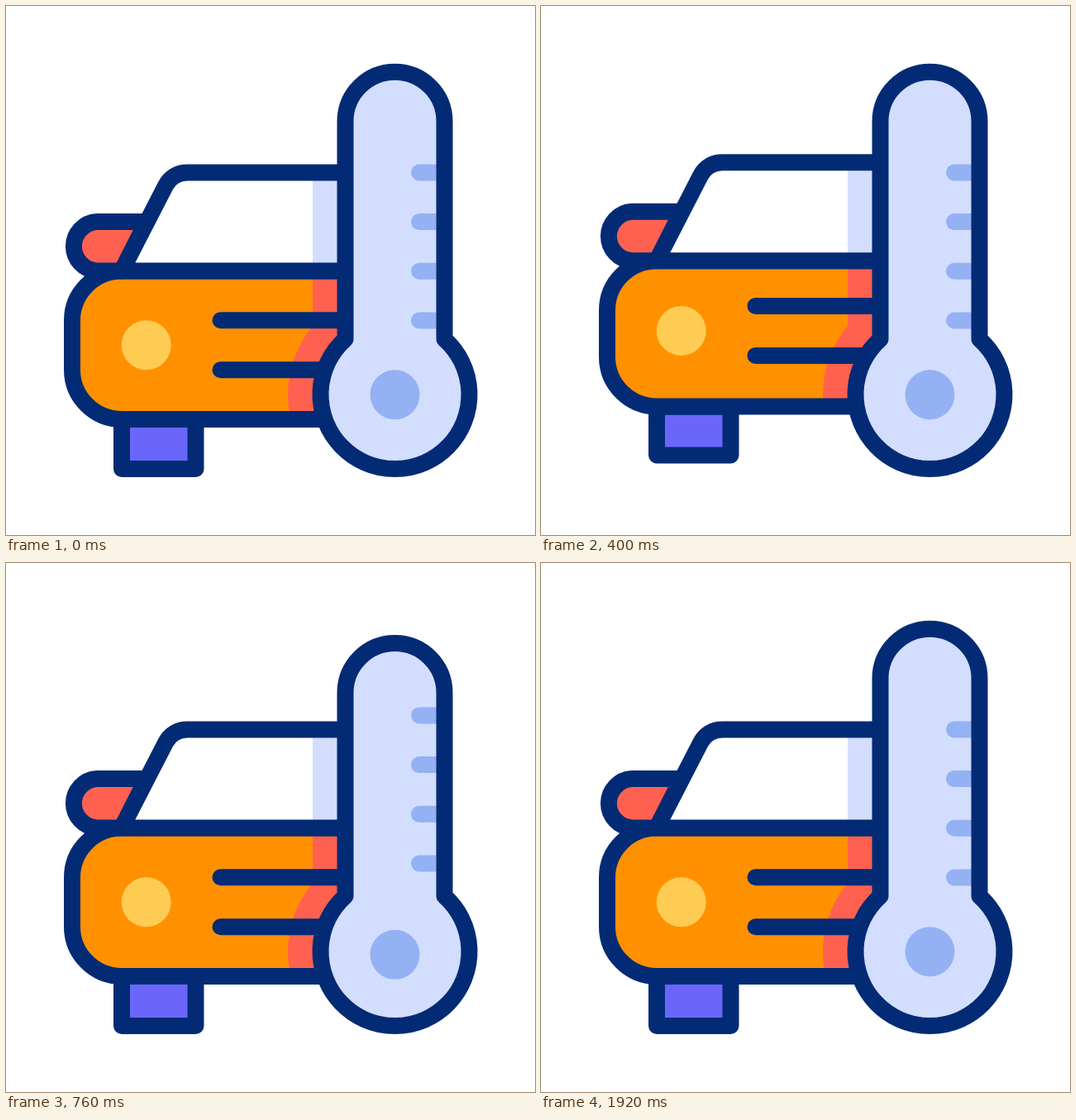
Animation, 640 px wide and 640 px high, one loop 2000 ms. Source, as an HTML page with a canvas:

```html
<!DOCTYPE html>
<html lang="en">
<head>
<meta charset="utf-8">
<title>Car temperature</title>
<style>
  html, body { margin: 0; width: 100%; height: 100%; overflow: hidden; background: #fff; }
  canvas { display: block; width: 640px; height: 640px; }
</style>
</head>
<body>
<canvas id="stage" width="640" height="640"></canvas>
<script>
const ctx = document.getElementById('stage').getContext('2d');
const LOOP = 2000;
const NAVY = '#032b75', ORANGE = '#ff9100', YELLOW = '#ffcc53', RED = '#ff6150';
const PALE = '#d3ddfd', BLUE = '#94b1f4', PURPLE = '#6b66fb';

const clamp = u => Math.min(1, Math.max(0, u));
const smooth = u => u * u * (3 - 2 * u);

// Eased value between [time, value] keys
function keyed(t, keys) {
  let [t0, v0] = keys[0];
  for (const [t1, v1] of keys) {
    if (t < t1) return v0 + (v1 - v0) * smooth(clamp((t - t0) / (t1 - t0)));
    [t0, v0] = [t1, v1];
  }
  return v0;
}

const hop = (t, up, down) => keyed(t, [[40, 0], [280, -up], [520, down], [760, 0]]);

function fill(path, color) {
  ctx.fillStyle = color;
  ctx.fill(new Path2D(path));
}

function stroke(path, color = NAVY, width = 20) {
  ctx.strokeStyle = color;
  ctx.lineWidth = width;
  ctx.stroke(new Path2D(path));
}

function shape(path, color) {
  fill(path, color);
  stroke(path);
}

function dot(x, y, r, color) {
  ctx.fillStyle = color;
  ctx.beginPath();
  ctx.arc(x, y, r, 0, 7);
  ctx.fill();
}

// The thermometer's shadow, seen only inside the given path
function shade(path, color) {
  ctx.save();
  ctx.clip(new Path2D(path));
  fill('M371 100H480V470H371z', color);
  dot(470.5, 470, 129.5, color);
  ctx.restore();
}

function drawCar(t) {
  const lift = hop(t, 50.7, 25.2);
  const top = 320.5 + lift;
  const bottom = 500 + hop(t, 46.6, 14.6);
  const wheel = 560 + hop(t, 33.5, 0);
  const front = hop(t, 69.8, 33.7);

  shape(`M140 ${bottom}V${wheel}H229.5V${bottom}z`, PURPLE);

  const body = `M470 ${top}H140a60 60 0 0 0-60 60V${bottom - 60}a60 60 0 0 0 60 60H470`;
  fill(body, ORANGE);
  shade(body, RED);
  stroke(body);

  ctx.save();
  ctx.translate(0, lift);
  shape('M170 261H110a29.8 29.8 0 0 0 0 59.5H140z', RED);
  const cabin = 'M140 320.5L193 217.5C198.500 207 208 201.500 219.500 201.500H470V320.500z';
  fill(cabin, '#fff');
  shade(cabin, PALE);
  stroke(cabin);
  ctx.restore();

  dot(169.7, 410.3 + front, 30, YELLOW);
  stroke(`M259.500 ${380.3 + front}H415M259.500 ${440.3 + front}H386.500`);
}

function drawThermometer(t) {
  const crown = 139.7 + keyed(t, [[440, 0], [640, -18], [800, 23.5], [960, 0]]);
  const rise = keyed(t, [[400, 0], [640, -25], [960, 0]]);
  const bulb = keyed(t, [[400, 0], [640, -10], [800, 6], [960, 0]]);
  const glass = `M410.500 403V${crown}a60 60 0 0 1 120 0V403a90 90 0 1 1-120 0z`;

  fill(glass, PALE);
  dot(470.5, 470.2 + bulb, 30, BLUE);

  for (let i = 0; i < 4; i++) {
    const y = 380.5 - 59.7 * i + rise;
    stroke(`M500 ${y}H530`, BLUE);
    const head = 530 - 30 * clamp((t - 1000 - 120 * i) / 120);
    const tail = 530 - 30 * clamp((t - 1200 - 175 * i) / 170);
    if (head < tail) stroke(`M${tail} ${y}H${head}`, ORANGE, 23);
  }
  stroke(glass);
}

function frame() {
  const t = performance.now() % LOOP;
  ctx.fillStyle = '#fff';
  ctx.fillRect(0, 0, 640, 640);
  ctx.lineCap = ctx.lineJoin = 'round';
  drawCar(t);
  drawThermometer(t);
  requestAnimationFrame(frame);
}
frame();
</script>
</body>
</html>
```
